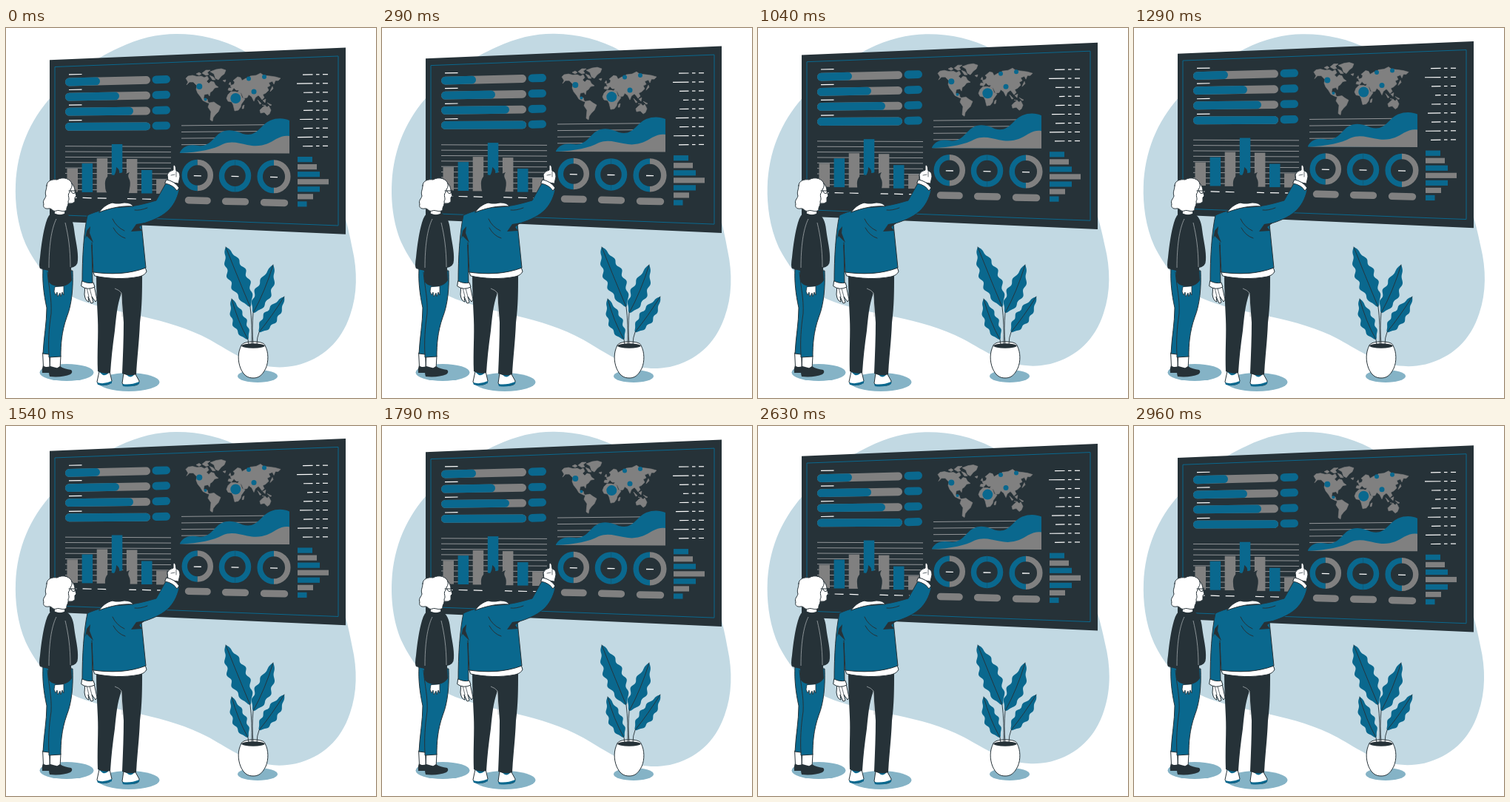
Recreate the animation shown at these times as an HTML page. Size 500 px wide and 500 px high, loop 3 s.

```html
<!DOCTYPE html>
<html lang="en">
<head>
<meta charset="utf-8">
<title>Dashboard</title>
<style>
html, body { margin: 0; width: 100%; height: 100%; overflow: hidden; background: #fff; }
svg { display: block; width: 100%; height: 100%; }
.d { fill: #263238; }
.b { fill: #0a688e; }
.g { fill: #808080; }
.w { fill: #fff; }
.s { fill: #85b3c6; }
.o { stroke: #263238; stroke-linejoin: round; stroke-linecap: round; }
.l { fill: none; stroke: #263238; stroke-linecap: round; stroke-linejoin: round; }
.t { fill: none; stroke: #b5babd; stroke-width: .7; }
</style>
</head>
<body>
<svg viewBox="0 0 500 500">
  <path id="blob" fill="#c2d9e3" d="M230 8C262 8 292 15 320 30C375 60 405 130 430 180C450 220 462 265 468 298C475 328 475 360 465 388C453 424 428 447 392 456C381 458 371 459 362 458C330 456 305 438 275 421C245 405 215 397 185 390C150 382 112 375 85 361C62 348 40 320 27 293C15 266 12 235 13 212C15 165 32 125 62 92C92 60 120 42 152 27C179 14 205 8 230 8Z"/>

  <g id="board">
    <path class="d" d="M59 43.200L459 26.500V278.800L59 261Z"/>
    <path fill="none" stroke="#0a688e" d="M66 52.500L449 38V267L66 252.500Z"/>
    <g id="charts"></g>
    <g class="g" stroke="#808080" stroke-width=".6" stroke-linejoin="round">
      <path d="M243 68L246 65L252 64L258 65.500L264 65L268 67L272 65L274 69L271 72L274 75L277 72L281 73L283 77L287 80L282 81L279 85L276 87L275 92L273 89L268 90L267 95L270 97L272 96L273 100L276 102L272 101L266 98L263 93L259 88L257 83L258 78L253 73L248 73L244 77L246 73Z"/>
      <path d="M257 62L261 60L264 62L261 64ZM265 61L270 57L276 57L272 60L274 63L270 64ZM275 64L280 66L283 70L279 70Z"/>
      <path d="M276 59L284 56L291 55L297 57L295 62L291 65L287 70L283 68L281 62Z"/>
      <path d="M275 101L281 100L285 103L290 106L287 113L283 117L280 121L279 126L276 124L277 113L273 107Z"/>
      <path d="M300 90L304 86L310 86L317 88L319 94L323 96L318 103L317 107L314 111L309 112L307 104L305 100L300 99L298 95ZM320 105L322 104L321 109L319 109Z"/>
      <path d="M300 84L301 81L305 81L303 78L308 76L309 73L307 71L313 66L317 67L319 71L324 68L328 68L330 65L338 64L344 61L348 64L357 65L364 66L371 68L368 71L364 71L362 76L360 72L355 74L357 78L353 80L355 84L351 88L347 90L349 94L346 97L343 93L341 91L337 94L335 99L332 93L328 90L326 94L321 95L318 88L313 87L315 84L311 84L308 81L305 85Z"/>
      <path d="M301 76L303 73L304 77ZM293 71L297 70L296 73ZM358 83L360 79L361 82L357 86ZM340 97L345 102L343 103ZM347 98L351 96L350 101ZM346 104L351 105ZM353 101L359 104L357 105Z"/>
      <path d="M343 111L347 107L350 105L353 107L355 105L358 111L356 116L353 118L349 114L344 115Z"/>
    </g>
    <g id="dots" class="b"></g>
    <path class="b" d="M235 168C240 159 248 157 260 159C275 161 280 148 289 142C300 135 311 139 320 143C340 148 342 132 357 125C367 121 376 122 383 125V169H235Z"/>
    <path class="g" d="M235 169C262 168 280 164 293 157C305 152 315 156 326 158C345 162 355 156 365 150C372 146 378 145 383 146V169.500Z"/>
  </g>

  <g id="plant">
    <ellipse class="s" cx="340" cy="470.500" rx="27" ry="8.500"/>
    <path class="w o" d="M318 429C319 422 349 422 350 429C355 438 355 451 351 460C346 470 341 473 334 473C326 473 321 469 317 460C313 450 313 438 318 429Z"/>
    <ellipse class="d" cx="334" cy="429.500" rx="15.500" ry="3.300"/>
  </g>

  <g id="woman">
    <ellipse class="s" cx="82" cy="465.500" rx="36.500" ry="11.500"/>
    <path class="w o" d="M50 439H60L59 460H51ZM59 443H74L73 461H60Z"/>
    <path class="d" d="M50 456C53 459 57 458 60 457L75 461L73 466H49Q48 461 50 456ZM59 459C64 462 69 460 73 457C77 460 82 461 88 462Q91 465 87 468C80 471 70 472 59 471Q57 465 59 459Z"/>
    <path class="b o" d="M50 326L90 328C91 350 89 374 82 391C75 411 74 428 74 444L58 445V441L50 440C51 418 55 399 55 378C51 360 49 342 50 326Z"/>
    <path class="l" d="M56 330C58 352 62 365 61 386C58 405 57 424 58 441"/>
    <path class="w o" d="M66 243L65 253H80L79 243Z"/>
    <path class="d" d="M63 249C69 253 76 253 80 250C88 254 91 262 92 272C94 288 98 302 97 314Q97 322 88 324L89 341C83 350 72 351 62 347Q56 344 57 336V328L46 325Q44 322 46 310C48 291 50 277 54 263Q57 252 63 249Z"/>
    <path class="t" d="M68 258C61 272 58 296 58 324M80 263C84 280 87 298 87 323"/>
    <path class="w o" stroke-width=".8" d="M66 350L65 356L67 361L69 357L70 363L73 358L74 363L76 357L78 361L78 349Z"/>
    <path class="w o" d="M85 207C91 210 93 216 93 220L95 227L93 229L93 235Q90 238 84 237L80 244H67L64 220Z"/>
    <path class="w o" d="M55 213C55 206 63 204 69 205C77 200 88 204 89 211C90 216 86 218 86 222C82 226 87 230 84 234C85 240 81 242 82 246C77 250 72 245 68 247C63 249 62 243 58 244C51 245 50 241 51 238C49 233 53 231 54 227C52 221 55 219 55 213Z"/>
    <path class="l" d="M85 220H95M88 220Q89 225 93 223L94 219"/>
  </g>

  <g id="man">
    <ellipse class="s" cx="166" cy="478.500" rx="41.500" ry="12.500"/>
    <path class="w o" d="M126 464L123 478Q124 483 132 482Q141 483 143 477L140 464ZM159 466L157 480Q160 485 169 483Q181 484 180 477L174 466Z"/>
    <path class="b" d="M125 464H140Q137 470 131 469ZM159 466H175Q171 473 166 471ZM123 479Q132 482 143 477V480Q134 485 124 482ZM157 481Q168 483 180 478V481Q170 486 158 484Z"/>
    <path class="d" d="M122 333H184C184 354 184 376 181 398C180 424 177 447 176 468Q167 471 157 467C158 443 159 420 159 398L156 358C150 375 149 390 147 409C144 430 142 449 141 466Q132 468 124 464C123 437 125 416 124 393C123 372 122 353 122 333Z"/>
    <path class="t" d="M147 352Q153 354 156 358L157 390"/>
    <path class="w o" d="M107 347L106 360Q107 369 112 370L111 363L115 372L118 371L116 363L121 370L123 367L119 348Z"/>
    <path class="l" stroke-width=".7" d="M109 351L112 363M113 352L116 363"/>
    <path class="w o" d="M118 329C140 333 166 333 188 323L190 329Q188 334 180 336C160 340 138 339 120 335Z"/>
    <path class="b o" d="M110 253C123 247 142 242 157 242C177 241 192 236 203 233L217 208Q229 209 234 219C231 232 226 240 219 247C208 257 195 261 183 265L189 324C166 333 140 333 118 330L116 293L117 345Q110 349 103 343C103 311 105 276 110 253Z"/>
    <path class="d" d="M109 274L114 268L113 277L118 290L109 281L107 285ZM169 275L176 265L188 263L180 269L184 274Z"/>
    <path class="l" d="M144 258Q149 269 160 274M145 270Q151 281 161 284M116 290L117 330M191 243Q181 247 174 246"/>
    <path class="w o" d="M103 342Q111 346 118 344L120 350Q110 355 102 349Z"/>
    <path class="w o" d="M126 249C130 243 136 238 144 236H160Q169 236 172 241C156 240 142 243 126 249Z"/>
    <path class="d" d="M134 213C133 203 138 197 146 199Q149 195 149 188Q154 191 153 196Q159 196 162 190Q164 194 162 197L167 195Q164 199 166 203Q169 208 167 217C166 224 164 232 160 236C154 238 147 238 143 236Q139 231 138 225Q134 221 134 213Z"/>
    <path class="w o" d="M219 207L218 198Q220 193 226 192L226 186Q228 184 229 187L230 193Q235 194 235 201L233 210Z"/>
    <path class="l" stroke-width=".7" d="M223 199L228 198M230 194V201"/>
    <path class="w o" d="M217 205Q228 207 234 216L231 220Q226 212 215 210Z"/>
  </g>
</svg>
<script>
const $ = id => document.getElementById(id);
const BLUE = '#0a688e', GREY = '#808080', GRID = '#929598';
const line = (x1, y1, x2, y2, color = '#fff', width = 1.2, cap = 'butt') =>
  `<path d="M${x1} ${y1}L${x2} ${y2}" stroke="${color}" stroke-width="${width}" stroke-linecap="${cap}"/>`;
const rect = (x, y, w, h, color) =>
  `<rect x="${x}" y="${y}" width="${w}" height="${h}" fill="${color}"/>`;
const pill = (x1, y1, x2, y2, color, h) =>
  line(x1 + h / 2, y1, x2 - h / 2, y2, color, h, 'round');
const alternate = i => i % 2 ? GREY : BLUE;

let charts = '';

// Progress bars
[127, 153, 172, 195].forEach((end, i) => {
  const y = 73 + i * 20.1, drop = 2.6 - i * 0.7;
  const yEnd = y - drop * (end - 80) / 115;
  const title = 62.8 + i * 20.7;
  charts += line(85, title, 102.5, title - 0.3)
    + pill(80, y, 195, y - drop, GREY, 10.8)
    + pill(80, y, end, yEnd, BLUE, 10.8)
    + pill(197.5, 69.8 + i * 20.8, 222, 69.4 + i * 20.8, BLUE, 10.8);
});

// Column chart
for (let i = 0; i < 9; i++) charts += line(80, 159.7 + i * 7.35, 223, 160.3 + i * 7.35, GRID, 1);
[190, 183, 176, 157, 177, 192, 205].forEach((top, i) => {
  const x = 82.5 + i * 20.1, base = 221.5 + i * 0.4;
  charts += rect(x, top, 14.5, base - top, alternate(i + 1))
    + line(x + 1, base + 7.5, x + 13, base + 7.9);
});

// Grid behind the area chart
for (let i = 0; i < 4; i++) charts += line(237, 131.9 + i * 8.6, 383, 130.4 + i * 8.8, GRID, 1);

// Ring charts with captions
[[258.8, 199, 17.5, GREY], [309.5, 199.8, 18, BLUE], [362, 200.8, 18.8, GREY]].forEach(([x, y, r, right], i) => {
  const arc = (sweep, color) =>
    `<path d="M${x} ${y - r}A${r} ${r} 0 0 ${sweep} ${x} ${y + r}" fill="none" stroke="${color}" stroke-width="7.500"/>`;
  charts += arc(0, BLUE) + arc(1, right) + line(x - 5, y + 0.6, x + 5, y + 0.8, '#fff', 1.3)
    + pill(x - 17 - i * 0.6, y + 33.8 + i * 0.6, x + 18 + i * 0.6, y + 34.4 + i * 0.6, GREY, 9.5);
});

// Table on the right
[401, 393, 402, 407, 402, 397, 402, 394, 401].forEach((x, i) => {
  const y = 63.1 + i * 12.08;
  charts += line(x, y, 414.5, y - 0.2) + line(419, y - 0.3, 423.5, y - 0.3) + line(428, y - 0.4, 435, y - 0.4);
});

// Horizontal bars
[20, 26, 30, 42, 30, 21, 12.5].forEach((w, i) => {
  charts += rect(394, 174 + i * 10.05, w, 7.2, alternate(i));
});
$('charts').innerHTML = charts;

$('dots').innerHTML = [[261.3, 79, 4], [269.5, 96.5, 2], [310.3, 95, 7], [328, 68.5, 3], [349, 66, 3], [335, 86, 3.5]]
  .map(([x, y, r]) => `<circle cx="${x}" cy="${y}" r="${r}"/>`).join('');

// Leaf with scalloped edges along a quadratic curve, then a stem into the pot
function leaf([x0, y0], [cx, cy], [x1, y1], width, waves, stem) {
  const left = [], right = [];
  for (let i = 0; i <= 60; i++) {
    const s = i / 60, q = 1 - s;
    const x = q * q * x0 + 2 * q * s * cx + s * s * x1;
    const y = q * q * y0 + 2 * q * s * cy + s * s * y1;
    const dx = q * (cx - x0) + s * (x1 - cx), dy = q * (cy - y0) + s * (y1 - cy);
    const body = width * Math.sin(Math.PI * s ** 1.15) ** 0.65;
    const k = body * (1 + 0.16 * Math.sin(s * waves * 2 * Math.PI)) / Math.hypot(dx, dy);
    left.push(`${x - dy * k} ${y + dx * k}`);
    right.unshift(`${x + dy * k} ${y - dx * k}`);
  }
  return `<path class="b" d="M${left.concat(right).join('L')}Z"/>`
    + `<path class="l" stroke-width=".9" d="M${x0} ${y0}Q${cx} ${cy} ${x1} ${y1}${stem}"/>`;
}
$('plant').insertAdjacentHTML('beforeend',
  leaf([297, 296], [312, 334], [330, 377], 12.5, 5, 'Q333 400 332 428')
  + leaf([361, 320], [350, 356], [334, 385], 10.5, 4, 'Q332 405 334 428')
  + leaf([305, 366], [313, 396], [327, 421], 9, 4, 'L328 428')
  + leaf([376, 363], [359, 390], [342, 411], 9, 4, 'Q339 418 339 428'));

// Board floats up and down linearly; the backdrop sways one degree either way
function draw(now) {
  const t = now % 3000;
  const lift = 9.8 * (1 - Math.abs(1 - t / 1500));
  const sway = Math.asin(Math.sin(2 * Math.PI * t / 1500)) * 2 / Math.PI;
  $('board').setAttribute('transform', `translate(0 ${-lift})`);
  $('blob').setAttribute('transform', `rotate(${sway} 243 233)`);
  requestAnimationFrame(() => draw(performance.now() - start));
}
const start = performance.now();
draw(0);
</script>
</body>
</html>
```
